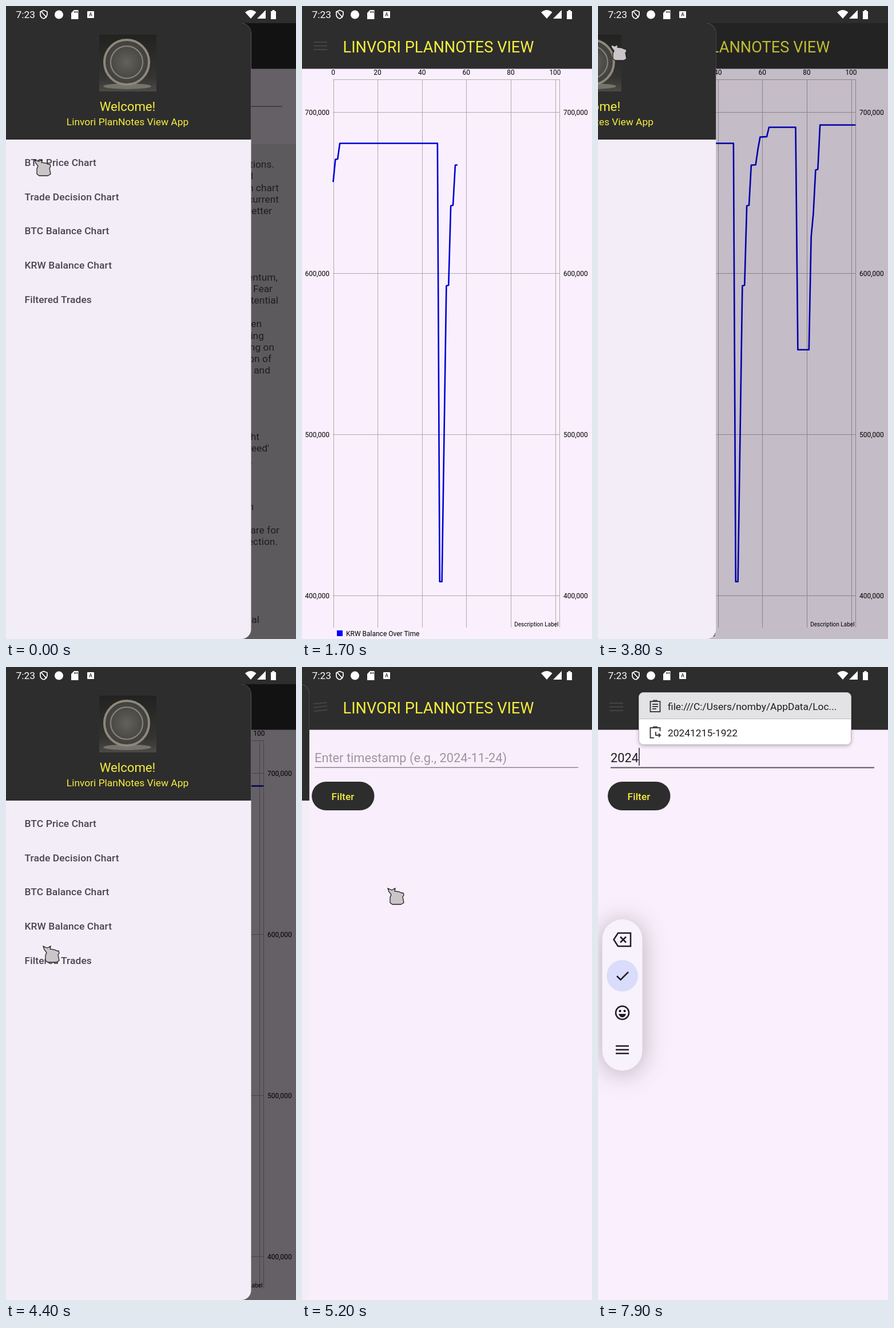
Recreate the animation shown at these times as an HTML page. Size 507x1104 px, loop 8 s.

```html
<!DOCTYPE html>
<html lang="en">
<head>
<meta charset="utf-8">
<style>
  html, body { margin: 0; width: 100%; height: 100%; overflow: hidden; background: #faf0fd; }
  svg { display: block; width: 100vw; height: 100vh; }
  text { font-family: Roboto, sans-serif; }
  .medium { font-weight: 500; letter-spacing: .1px; }
  .line { fill: none; stroke-width: 2; }
  #palette { filter: drop-shadow(0 4px 22px rgba(40, 30, 40, .32)); }
  #popup { filter: drop-shadow(0 2px 3px rgba(0, 0, 0, .25)); }
</style>
</head>
<body>
<svg id="stage" viewBox="0 0 507 1104">
  <defs>
    <linearGradient id="night" x2="0" y2="1">
      <stop offset="0" stop-color="#222221"/><stop offset=".75" stop-color="#343432"/><stop offset="1" stop-color="#4b4a47"/>
    </linearGradient>
    <radialGradient id="metal">
      <stop offset="0" stop-color="#62615c"/><stop offset="1" stop-color="#3f3e3b"/>
    </radialGradient>
    <clipPath id="panel"><rect x="-40" y="30" width="468.5" height="1074" rx="17"/></clipPath>
  </defs>
  <rect width="507" height="1104" fill="#faf0fd"/>

  <g id="list"><rect y="241" width="507" height="863" fill="#eae2ec"/></g>
  <g id="chart">
    <g id="grid" stroke="#999" stroke-width="1" opacity=".8"></g>
    <polyline id="curve" class="line" stroke="#0000d8" style="stroke-width:2.6" stroke-linejoin="round"/>
    <rect x="61" y="1089" width="10" height="10" fill="#00f"/>
  </g>
  <g id="form">
    <rect id="rule" x="22" width="461" fill="#5b5560"/>
    <rect x="17" y="200" width="109.5" height="50" rx="25" fill="#2d2d2d"/>
    <rect id="caret" y="141" width="2" height="31" fill="#5d5468"/>
  </g>

  <g id="header">
    <rect y="29" width="507" height="80.5" fill="#2d2d2d"/>
    <path id="burger" class="line" stroke="#46434a" d="M20 63H44M20 69.5H44M20 76H44"/>
  </g>
  <rect id="scrim" y="29" width="507" height="1075"/>

  <g id="drawer"><g id="sheet" clip-path="url(#panel)">
    <rect x="-40" y="30" width="469" height="1074" fill="#f3edf7"/>
    <rect x="-40" y="30" width="469" height="203" fill="#2d2d2d"/>
    <rect x="163" y="50" width="100" height="99" fill="url(#night)"/>
    <ellipse cx="212" cy="140" rx="42" ry="5" fill="#76736a"/>
    <circle cx="211" cy="98" r="39" fill="url(#metal)" stroke="#8d897b" stroke-width="4"/>
    <circle cx="211" cy="98" r="28" fill="none" stroke="#89867c" stroke-width="2"/>
  </g></g>

  <g id="status" fill="#fff">
    <rect width="507" height="30" fill="#2d2d2d"/>
    <path class="line" stroke="#fff" style="stroke-width:1.7" d="M66 7.5L72 10V15Q71 20 66 22Q60 20 60 15V10ZM61 9L71 20"/>
    <circle cx="92.500" cy="15" r="7.500"/>
    <path d="M119 7H126.500V23H114V12ZM119 9V12H120.300V9ZM121.500 9V12H122.800V9ZM124 9V12H125.300V9Z" fill-rule="evenodd"/>
    <rect x="142" y="9" width="12" height="12" rx="1"/>
    <path d="M418 11Q428 3 437.500 11L428 22ZM439 22L454 7V22ZM463 9H465.500V7H469.500V9H472V23H463Z"/>
  </g>

  <g id="palette">
    <rect x="19.500" y="440" width="70" height="264" rx="35" fill="#f8f2fc"/>
    <circle cx="54.500" cy="538.500" r="27.500" fill="#dadcfb"/>
    <g class="line" stroke="#201a2c" style="stroke-width:2.5">
      <path d="M47 464H69V487H47L39.500 475.500ZM51 470.500L61 480.500M61 470.500L51 480.500M45 539L51.500 545.500L65 532"/>
      <circle cx="54.500" cy="603" r="11.500"/>
      <path d="M43 661H66M43 667.500H66M43 674H66"/>
    </g>
    <path d="M48 605H61Q59 611 54.500 611T48 605Z" fill="#201a2c"/>
    <circle cx="50.500" cy="600" r="2"/><circle cx="58.500" cy="600" r="2"/>
  </g>

  <g id="popup">
    <rect x="22.500" y="44.500" width="371" height="91" rx="8" fill="#fff"/>
    <path id="focus" d="M22.500 90.500V52.500Q22.500 44.500 30.500 44.500H385.500Q393.500 44.500 393.500 52.500V90.500Z" fill="#e3e2e4"/>
    <path d="M22.500 90.500H393.500" stroke="#bdb9c0"/>
    <rect x="22.500" y="44.500" width="371" height="91" rx="8" fill="none" stroke="#bdb9c0"/>
    <g class="line" stroke="#444047">
      <path d="M42.500 60H59.500V78H42.500ZM47 58.500H55M46 65H56M46 69H56M46 73H53"/>
      <path d="M49 123.500H42.500V106H59.500V112M47 104.500H55M52 113V119H60M57 116L60 119L57 122"/>
    </g>
  </g>

  <path id="pointer" d="M0 1L7 4L13 1L12 6L20 7Q24 10 27 9L28 13L26 16L28 26L23 29H8L4 26V17L6 12L2 7Z" fill="#c9c5c8" stroke="#222" stroke-width="1.300"/>
</svg>

<script>
const $ = id => document.getElementById(id);
const NS = 'http://www.w3.org/2000/svg';
const YELLOW = '#f5ee3e';

function add(parent, tag, attrs, content = '') {
  const el = document.createElementNS(NS, tag);
  for (const k in attrs) el.setAttribute(k, attrs[k]);
  el.textContent = content;
  return $(parent).appendChild(el);
}

// Text placed by the middle of its capitals
function label(parent, content, x, mid, size, fill, anchor = 'start', cls = '') {
  return add(parent, 'text', { x, y: mid + size * .355, 'font-size': size, fill, 'text-anchor': anchor, class: cls }, content);
}

label('status', '7:23', 17.5, 15, 17.4, '#fff');
label('status', 'A', 148, 15, 9, '#2d2d2d', 'middle', 'medium');
label('header', 'LINVORI PLANNOTES VIEW', 71.5, 71, 27.2, YELLOW);
label('sheet', 'Welcome!', 212.5, 175, 22.2, YELLOW, 'middle');
label('sheet', 'Linvori PlanNotes View App', 212.5, 202, 17.4, YELLOW, 'middle');
['BTC Price Chart', 'Trade Decision Chart', 'BTC Balance Chart', 'KRW Balance Chart', 'Filtered Trades']
  .forEach((s, i) => label('sheet', s, 32.5, 273 + i * 59.6, 17.4, '#48444c', 'start', 'medium'));
label('popup', 'file:///C:/Users/nomby/AppData/Loc...', 73, 69, 17.4, '#1c1b1f');
label('popup', '20241215-1922', 73, 115, 17.4, '#1c1b1f');
label('form', 'Filter', 71.5, 225.5, 17.2, YELLOW, 'middle', 'medium');
const entry = label('form', '', 22, 158, 21.8);

// Line ends of the article: text, right edge, middle
[['conditions.', 469, 276], ['and', 432, 296], ['on chart', 477, 317], ['current', 477, 337], ['better', 465, 357],
 ['momentum,', 475, 473], ['Fear', 466, 493], ['potential', 476, 513], ['when', 447, 554], ['using', 451, 575],
 ['relying on', 469, 595], ['on of', 464, 615], ['and', 462, 635], ['might', 443, 751], ["'Greed'", 460, 771],
 ['it.', 431, 792], ['in', 433, 873], ['are for', 478, 914], ['direction.', 475, 934], ['final', 443, 1070]]
  .forEach(([s, x, y]) => label('list', s, x, y, 17.4, '#49454f', 'end'));

// Chart
const px = i => 54.5 + i * 3.88;
const rule = (x1, y1, x2, y2) => add('grid', 'line', { x1, y1, x2, y2 });
for (let i = 0; i <= 100; i += 20) {
  const x = Math.round(px(i)) + .5;
  rule(x, 128, x, 1084);
  label('chart', i, px(i), 115.5, 12, '#000', 'middle');
}
for (let k = 0; k < 4; k++) {
  const y = 185.5 + k * 281, s = 7 - k + '00,000';
  rule(54, y, 451, y);
  label('chart', s, 48, y, 12, '#000', 'end');
  label('chart', s, 457, y, 12, '#000');
}
rule(54, 128.5, 451, 128.5);
rule(450.5, 128, 450.5, 1084);
label('chart', 'Description Label', 448.5, 1078.5, 10, '#000', 'end');
label('chart', 'KRW Balance Over Time', 77, 1094.5, 12, '#000');

// Piecewise linear value of [key, value...] rows
function at(rows, key, col = 1) {
  const n = rows.findIndex(r => r[0] > key);
  if (n < 0) return rows[rows.length - 1][col];
  if (n === 0) return rows[0][col];
  const a = rows[n - 1], b = rows[n];
  return a[col] + (b[col] - a[col]) * (key - a[0]) / (b[0] - a[0]);
}
const knots = [[0, 307], [1, 267.5], [2, 267], [3, 239.5], [47, 239.5], [48, 1004], [49, 1004], [50, 747], [51, 488],
  [52, 487], [53, 348.5], [54, 347.5], [55, 277.5], [57, 277], [58, 250], [59, 228.5], [62, 228], [63, 211.5], [75, 211.5],
  [76, 599.5], [81, 599.5], [82, 403], [83, 361], [84, 286], [85, 285], [86, 207.5], [102, 207.5]];
const points = Array.from({ length: 103 }, (_, i) => px(i) + ',' + at(knots, i));

// Pointer path: time, x, y
const route = [[0, 50, 267], [250, 50, 267], [600, 64, 442], [900, 64, 442], [1300, -40, 470], [3150, -40, 80],
  [3600, 22, 66], [3900, 22, 66], [4400, 65, 486], [4950, 70, 484], [5200, 150, 385], [5700, 90, 150]];

const CLOSE_A = 870, OPEN = 3737, CLOSE_B = 4942, FOCUS = 5850;
const keys = [6850, 7150, 7400, 7650];
const clamp = v => Math.max(0, Math.min(1, v));
const settle = (t, from) => 1 - (1 - clamp((t - from) / 512)) ** 5;
const show = (id, on) => $(id).style.display = on ? '' : 'none';
const move = (id, x, y = 0) => $(id).setAttribute('transform', `translate(${x} ${y})`);

function draw(t) {
  const open = 1 - settle(t, CLOSE_A) + settle(t, OPEN) - settle(t, CLOSE_B);
  const onChart = t >= CLOSE_A && t < CLOSE_B, focused = t >= FOCUS;

  show('list', t < CLOSE_A);
  show('chart', onChart);
  show('form', !onChart);
  move('drawer', (open - 1) * 428.5);
  $('scrim').setAttribute('opacity', .6 * open ** 1.4);
  $('burger').setAttribute('transform', `rotate(${-180 * open} 32 69.5)`);

  const count = Math.floor(102 * clamp((t - CLOSE_A) / 1500));
  $('curve').setAttribute('points', points.slice(0, count + 1).join(' '));

  const typed = keys.filter(k => t >= k).length;
  const shift = typed * 12.25;
  entry.textContent = typed ? '2024'.slice(0, typed) : 'Enter timestamp (e.g., 2024-11-24)';
  entry.setAttribute('fill', typed ? '#1d1b20' : '#9f96a4');
  $('rule').setAttribute('y', focused ? 174.5 : 174.7);
  $('rule').setAttribute('height', focused ? 2 : 1);
  show('caret', focused);
  $('caret').setAttribute('x', 22 + shift);

  show('popup', t >= FOCUS + 200);
  show('focus', typed > 0);
  move('popup', Math.round(shift));
  show('palette', t >= FOCUS + 100);
  move('palette', -12 * clamp((t - 6400) / 500));

  show('pointer', !focused);
  move('pointer', at(route, t), at(route, t, 2));
}

const start = performance.now();
function tick() {
  const t = (performance.now() - start) % 8000;
  draw(Math.floor(t / 100) * 100);
  requestAnimationFrame(tick);
}
tick();
</script>
</body>
</html>
```
